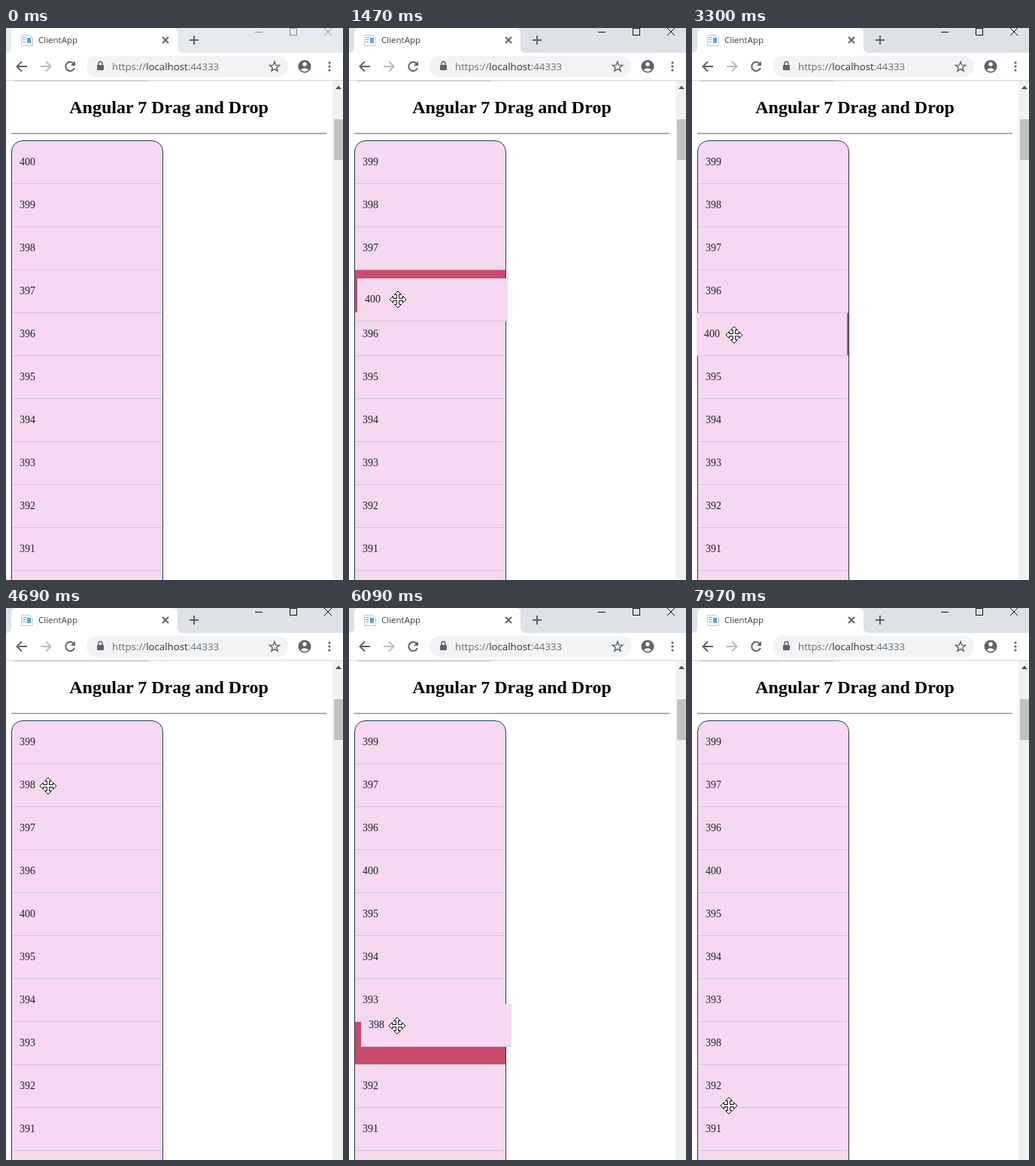
Recreate the animation shown at these times as an HTML page. Size 448 by 732 pixels, loop 8000 ms.

```html
<!DOCTYPE html>
<html lang="en">
<head>
<meta charset="utf-8">
<title>Drag and Drop</title>
<style>
  html, body { margin: 0; width: 100%; height: 100%; overflow: hidden; background: #fff; }
  svg { display: block; width: 448px; height: 732px; }
  .ui { font-family: "Open Sans", "Noto Sans", sans-serif; }
  .page { font-family: "Liberation Serif", "Times New Roman", serif; }
  .row text { font-size: 14px; fill: #222; }
  .row rect { fill: #f6d8f0; }
  .row.slot rect { fill: #cb486e; }
  .row path { stroke: #ccc; }
  .icon { fill: none; stroke: #5f6368; stroke-width: 2; }
  .thin { stroke-width: 1.4; }
  .disabled { stroke: #babcbe; }
</style>
</head>
<body>
<svg viewBox="0 0 448 732">
  <defs>
    <clipPath id="listClip"><rect x="7.5" y="149.5" width="201" height="700" rx="14.5"/></clipPath>
  </defs>

  <g class="page">
    <path d="M11 70.5H188" stroke="#dcc3d8"/>
    <path d="M188 70.5H208" stroke="#eee"/>
    <text x="216.5" y="113" font-size="24" font-weight="bold" text-anchor="middle">Angular 7 Drag and Drop</text>
    <path d="M7 139.5H426" stroke="#9a9a9a"/>
    <path d="M7 140.5H426" stroke="#c4c4c4"/>
    <g id="rows" clip-path="url(#listClip)"></g>
    <rect x="7.5" y="149.5" width="201" height="700" rx="14.5" fill="none" stroke="#1f3a57"/>
    <g id="preview"></g>
  </g>

  <g id="scrollbar">
    <rect x="434" y="70" width="14" height="662" fill="#f1f1f1"/>
    <path d="M438 81l4-4.5 4 4.5z" fill="#505050"/>
    <rect x="436" y="121" width="12" height="54" fill="#c1c1c1"/>
  </g>

  <g id="browser" class="ui">
    <rect id="titleBar" width="448" height="33"/>
    <path d="M0 33Q7 33 7 26V7Q7 0 14 0H221Q228 0 228 7V26Q228 33 236 33z" fill="#fff"/>
    <rect y="33" width="448" height="36" fill="#fff"/>
    <path d="M0 69.5H448" stroke="#d4d6d9"/>
    <path d="M20.5 9.5H31.5L35.5 13V23.500H20.5z" fill="#f5f8fb" stroke="#c3ccd5"/>
    <path d="M22 12.5h5M22 15.5h4M22 18.5h4" stroke="#9aa7b4"/>
    <rect x="28" y="13" width="5" height="7" fill="#5fa5d8"/>
    <text x="43" y="20" font-size="11.5" fill="#3c4043">ClientApp</text>
    <path class="icon" d="M208 12l8 8M216 12l-8 8"/>
    <path class="icon" d="M244 16h12M250 10v12"/>
    <g id="controls" fill="none">
      <path d="M331 5.5h10"/>
      <rect x="377.5" y=".5" width="9" height="9"/>
      <path d="M423 0l10 10M433 0l-10 10"/>
    </g>
    <path class="icon" d="M28 51H15M21 44.5L14.5 51l6.5 6.5"/>
    <path class="icon disabled" d="M46 51H59M53 44.5L59.5 51l-6.5 6.5"/>
    <path class="icon" d="M90 47.2A6 6 0 1 0 91 53"/>
    <path d="M92 44v6h-6z" fill="#5f6368"/>
    <rect x="107" y="37" width="268" height="28" rx="14" fill="#f1f3f4"/>
    <rect x="121" y="49" width="9" height="7" rx="1" fill="#5f6368"/>
    <path class="icon thin" d="M123 49v-2a2.5 2.5 0 0 1 5 0v2"/>
    <text x="141" y="56" font-size="13.25" fill="#6b6f74">https://<tspan fill="#303338">localhost</tspan>:44333</text>
    <path id="star" class="icon thin"/>
    <circle cx="397" cy="51" r="8.5" fill="#5f6368"/>
    <circle cx="397" cy="48" r="2.7" fill="#fff"/>
    <path d="M391.8 55.5q5.2-4.5 10.4 0q-5.2 4.5-10.4 0" fill="#fff"/>
    <path d="M430 46v10.1" stroke="#5f6368" stroke-width="3.2" stroke-linecap="round" stroke-dasharray="0 5"/>
  </g>

  <path id="cursor" fill="#fff" stroke="#111"/>
</svg>

<script>
const LOOP = 8000, TICK = 76.9, TICK_OFFSET = 7;
const LIST = { x: 8, y: 150, right: 209, width: 200, row: 57 };
const ENTER = { time: 69, x: 330, y: 732 };
const DROP_TIME = 200;

// Each pointer move: start, end, x, y. The pointer rests in between.
const moves = [
  [70, 690, 62, 178],
  [770, 910, 85, 259], [920, 1680, 59, 387], [1760, 1920, 59, 396],
  [2230, 2295, 62, 406], [2305, 2640, 58, 179], [2640, 2990, 56, 407],
  [3540, 3765, 64, 256], [4080, 4530, 56, 236],
  [4920, 5370, 79, 466], [5376, 5450, 65, 517], [5460, 5930, 66, 556],
  [5940, 6060, 64, 554], [6100, 6640, 59, 573],
  [7640, 7920, 49, 660]
];
const drags = [
  { label: 400, grab: 690, release: 3160 },
  { label: 398, grab: 4920, release: 7040 }
];

const $ = id => document.getElementById(id);
const clamp01 = p => Math.min(1, Math.max(0, p));
const smooth = p => p * p * (3 - 2 * p);
const mix = (a, b, p) => Math.round(a + (b - a) * p);
const place = (el, x, y) => el.setAttribute('transform', `translate(${x} ${y})`);
const slotTop = index => LIST.y + index * LIST.row;

function pointerAt(t) {
  return moves.reduce(({ x, y }, [start, end, toX, toY]) => {
    const p = smooth(clamp01((t - start) / (end - start)));
    return { x: mix(x, toX, p), y: mix(y, toY, p) };
  }, ENTER);
}

function makeRow(parent, label = '') {
  const g = document.createElementNS('http://www.w3.org/2000/svg', 'g');
  g.setAttribute('class', 'row');
  g.innerHTML = `<rect width="${LIST.width}" height="${LIST.row}"/>` +
    `<path d="M0 ${LIST.row - 0.5}H${LIST.width}"/><text x="10" y="32">${label}</text>`;
  parent.append(g);
  return g;
}

function starPath(cx, cy) {
  const points = Array.from({ length: 10 }, (_, i) => {
    const r = i % 2 ? 2.9 : 7, a = Math.PI * (i / 5 - 0.5);
    return `${cx + r * Math.cos(a)} ${cy + r * Math.sin(a)}`;
  });
  return `M${points.join('L')}z`;
}

// One arrow arm, turned by quarter turns.
function moveCursorPath() {
  const arm = [[-1.5, -1.5], [-1.5, -6.5], [-4.5, -6.5], [0, -11], [4.5, -6.5], [1.5, -6.5]];
  const points = [];
  for (let turn = 0; turn < 4; turn++) {
    const c = Math.round(Math.cos(turn * Math.PI / 2)), s = Math.round(Math.sin(turn * Math.PI / 2));
    points.push(...arm.map(([x, y]) => `${x * c - y * s} ${x * s + y * c}`));
  }
  return `M${points.join('L')}z`;
}

const MOVE_CURSOR = moveCursorPath();
const ARROW_CURSOR = 'M0 0V16L4 12.5L6.5 18L9 17L6.5 11.5H11.5z';
const labels = Array.from({ length: 11 }, (_, i) => 400 - i);
const rows = new Map(labels.map(label => [label, makeRow($('rows'), label)]));
const preview = makeRow($('preview'));
$('star').setAttribute('d', starPath(357, 51.5));

function render(time) {
  const t = Math.max(0, Math.floor((time + TICK_OFFSET) / TICK) * TICK - TICK_OFFSET);
  const pointer = pointerAt(t);
  const order = labels.slice();
  let held = null;

  for (const { label, grab, release } of drags) {
    if (t < grab) break;
    const home = order.indexOf(label);
    const from = pointerAt(grab), at = pointerAt(Math.min(t, release));
    const slot = Math.floor((at.y - LIST.y) / LIST.row);
    order.splice(home, 1);
    order.splice(slot, 0, label);

    const drop = clamp01((t - release) / DROP_TIME);
    if (drop < 1) held = {
      label,
      x: mix(LIST.x + at.x - from.x, LIST.x, drop),
      y: mix(slotTop(home) + at.y - from.y, slotTop(slot), drop)
    };
  }

  order.forEach((label, i) => {
    const row = rows.get(label);
    place(row, LIST.x, slotTop(i));
    row.classList.toggle('slot', held !== null && held.label === label);
  });

  preview.style.display = held ? '' : 'none';
  if (held) {
    preview.lastChild.textContent = held.label;
    place(preview, held.x, held.y);
  }

  const active = t >= drags[0].grab;
  $('titleBar').setAttribute('fill', active ? '#dee1e6' : '#e7eaed');
  $('controls').setAttribute('stroke', active ? '#111' : '#8d9095');

  const cursor = $('cursor');
  cursor.style.display = t < ENTER.time ? 'none' : '';
  cursor.setAttribute('d', pointer.x > LIST.right ? ARROW_CURSOR : MOVE_CURSOR);
  place(cursor, pointer.x, pointer.y);
}

const origin = performance.now();
function frame() {
  render((performance.now() - origin) % LOOP);
  requestAnimationFrame(frame);
}
render(0);
requestAnimationFrame(frame);
</script>
</body>
</html>
```
